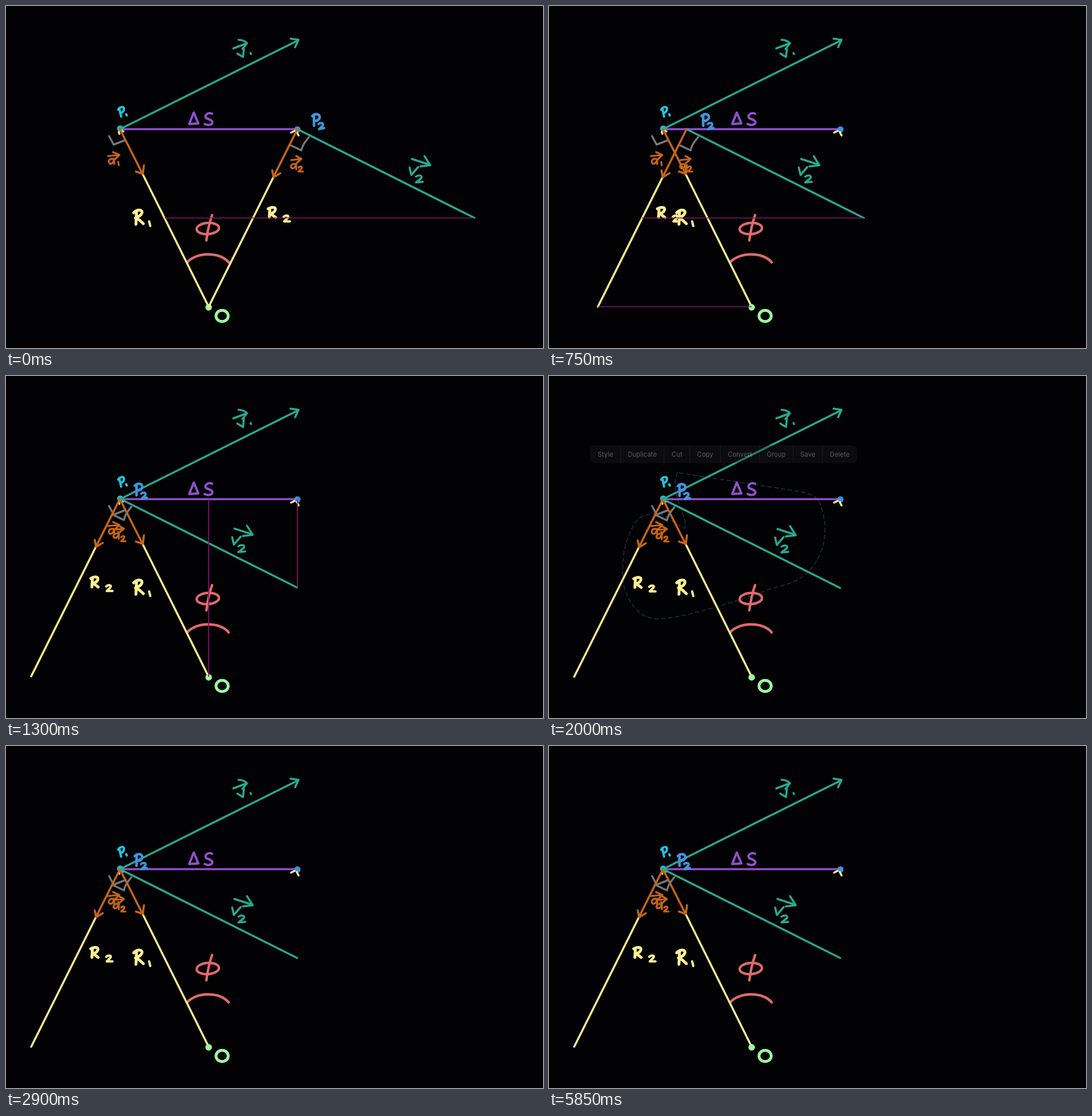
Animation, 938 px wide and 597 px high, one loop 5.9 s. Source, as an HTML page:

```html
<!DOCTYPE html>
<html lang="en">
<head>
<meta charset="utf-8">
<title>Circular motion vectors</title>
<style>
  html, body { margin: 0; width: 100%; height: 100%; overflow: hidden; background: #020103; }
  svg { display: block; width: 938px; height: 597px; }
  path, line, ellipse { fill: none; stroke-linecap: round; stroke-linejoin: round; }
  .teal { stroke: #27ab92; stroke-width: 3.5; }
  .purple { stroke: #9150cf; stroke-width: 3.6; }
  .cyan { stroke: #20c3df; stroke-width: 4; }
  .blue { stroke: #3f95df; stroke-width: 4.5; }
  .orange { stroke: #c66518; stroke-width: 3.6; }
  .yellow { stroke: #fff092; stroke-width: 3.5; }
  .gray { stroke: #777; stroke-width: 3.5; }
  .red { stroke: #e06a6d; stroke-width: 4.3; }
  .green { stroke: #9cfb9c; stroke-width: 5; }
  .thin { stroke-width: 3.2; }
  .mid { stroke-width: 4; }
  .bold { stroke-width: 5; }
  .guide { stroke: #86146f; stroke-width: 1.7; stroke-linecap: butt; }
  .lasso { stroke: #4a7db3; stroke-width: 1.8; stroke-dasharray: 8 4; stroke-linecap: butt; }
  .menu { fill: #212023; }
  .menu path { fill: #212023; }
  .divider { stroke: #48474a; stroke-width: 1; stroke-linecap: butt; }
  text { fill: #fff; font: 11.4px Inter, Roboto, sans-serif; text-anchor: middle; }
</style>
</head>
<body>
<svg viewBox="0 0 938 597">
  <!-- fixed part of the drawing -->
  <g>
    <path class="red" d="M317 447C324 439 338 433.500 352 433.500C368 433.500 380 437 389 447.500"/>
    <ellipse class="red" cx="352.5" cy="388.5" rx="19.5" ry="9.8" transform="rotate(-4 352 388)"/>
    <path class="red" d="M360 365C355 379 352 393 350 409"/>

    <path class="yellow" d="M238 292L354 525"/>
    <path class="yellow bold" d="M228 359L227 381M223 361C229 354 240 355 237 362C235 367 229 369 226 370C232 371 235 376 240 380"/>
    <path class="yellow mid" d="M250 376L252 384"/>

    <path class="purple" d="M202 215H509"/>
    <path class="purple mid" d="M328 186L320 206L336 205ZM360 188C353 185 345 191 350 196C356 198 364 201 359 206C356 208 351 208 347 206"/>

    <circle cx="354" cy="526" r="5.7" fill="#9cfb9c"/>
    <ellipse class="green" cx="377.5" cy="541" rx="10.7" ry="9.7"/>

    <circle cx="199.500" cy="214" r="5.500" fill="#20b5d3"/>
    <circle cx="509" cy="215.500" r="5.500" fill="#3f8fdd"/>
    <path class="yellow" d="M197 220L198 223M203 218L205 219M498 221L504 218M508 220L511 226"/>
    <path class="cyan" d="M198 179L201 193M196 181C199 175 207 175 206 180C206 184 203 186 200 187M210 189L211 191"/>

    <path class="teal" d="M199 215L510 60M497 57L511 59L505 72"/>
    <path class="teal" d="M397 74L421 65M406 59C412 59 417 61 421 65L413 75M404 83L414 89L415.500 75M427 82L428 84"/>

    <path class="gray" d="M180 227L188 242L206 235"/>
    <path class="orange" d="M199 215L238 292M227 289L239 293L241 278"/>
    <path class="orange thin" d="M178 262L198 260M187 255L198 260L191 267M188 267C181 265 177 272 181 275C185 277 188 272 189 267L189 276M196 272L197 278"/>
  </g>

  <!-- dragged selection -->
  <g id="drag">
    <path class="yellow" d="M467.500 298L354 525"/>
    <path class="yellow bold" d="M461 353L460 369M458 354C465 350 473 351 470 357C468 361 464 362 461 362C465 364 468 367 471 369"/>
    <path class="yellow mid" d="M485 368C489 364 496 366 492 370L486 376L496 376"/>
    <path class="teal" d="M509 215L818.500 370"/>
    <path class="teal" d="M709 267L740 277M731 262L741 278L724 280M705 282L708 295L720 281M716 298C721 294 729 296 725 301L716 308L728 307"/>
    <path class="blue" d="M538 191L538 209M535 192C540 187 549 188 548 195C547 199 542 201 538 201"/>
    <path class="blue mid" d="M546 206C550 203 556 204 553 209L547 215L556 213"/>
    <path class="gray" d="M497 243L516 252C518 243 521 239 529 229"/>
    <path class="orange" d="M509 215L467.500 298M465 287L467.500 299L479 292"/>
    <path class="orange thin" d="M498 269L516 267M507 262L516 267L508 274M506 276C499 274 496 280 499 283C503 285 506 280 507 276L507 285M511 282C514 279 519 280 516 284L511 289L519 289"/>
  </g>

  <g id="level">
    <line class="guide" id="mid" y1="370" y2="370"/>
    <line class="guide" id="base" x2="354" y1="525" y2="525"/>
  </g>
  <path class="guide" id="plumb" d="M354 215V525M509 215V370"/>

  <g id="selection">
    <path class="lasso" d="M227 169L440 202C460 206 468 212 473 222C479 237 483 257 482 275C480 305 465 338 436 355C420 364 400 367 380 374C345 388 318 395 292 403C255 414 215 424 186 424C155 421 141 396 132 371C127 350 129 325 131 306C137 280 148 250 166 244C180 239 190 238 200 243L232 264C240 268 239 262 238 255C234 238 222 215 221 194C220 175 223 167 227 169"/>
    <g class="menu" id="menu">
      <rect x="72" y="121" width="466" height="31" rx="8"/>
      <path d="M297 151L305 157L313 151Z"/>
    </g>
  </g>
</svg>
<script>
  const LOOP = 5900;
  const $ = id => document.getElementById(id);

  // time, x offset, y offset of the dragged selection
  const track = [
    [0, 0, 0], [200, -8, 0], [300, -22, 0], [400, -55, 0], [500, -118, 0],
    [600, -188, 0], [680, -236, 0], [750, -268.5, 0], [900, -291, 0],
    [1200, -306, 0], [1300, -310, -0.7], [1500, -310, 0], [LOOP, -310, 0]
  ];

  const add = (tag, attrs, label = '') => {
    const el = document.createElementNS('http://www.w3.org/2000/svg', tag);
    for (const key in attrs) el.setAttribute(key, attrs[key]);
    el.textContent = label;
    $('menu').append(el);
  };

  const edges = [72, 125, 201, 246, 299.5, 367.5, 426.5, 478, 538];
  ['Style', 'Duplicate', 'Cut', 'Copy', 'Convert', 'Group', 'Save', 'Delete'].forEach((label, i) => {
    if (i) add('line', { class: 'divider', x1: edges[i], x2: edges[i], y1: 121, y2: 152 });
    add('text', { x: (edges[i] + edges[i + 1]) / 2, y: 141 }, label);
  });

  function offsetAt(t) {
    const i = track.findIndex(key => key[0] > t);
    const [t0, x0, y0] = track[i - 1], [t1, x1, y1] = track[i];
    const p = (t - t0) / (t1 - t0);
    return [x0 + (x1 - x0) * p, y0 + (y1 - y0) * p];
  }

  const show = (id, on) => { $(id).style.display = on ? '' : 'none'; };
  const fade = (t, from, to) => Math.min(1, Math.max(0, (t - from) / (to - from)));

  function draw(now) {
    const t = now % LOOP;
    const [x, y] = offsetAt(t);
    $('drag').setAttribute('transform', `translate(${x} ${y})`);
    $('mid').setAttribute('x1', Math.min(277, 431 + x));
    $('mid').setAttribute('x2', 819 + x);
    $('base').setAttribute('x1', 354 + x);
    show('level', t < 1225);
    show('plumb', t >= 1225 && t < 1500);
    $('selection').style.opacity = fade(t, 1950, 2100) * (1 - fade(t, 2600, 2750));
  }

  const start = performance.now();
  function tick() {
    draw(performance.now() - start);
    requestAnimationFrame(tick);
  }
  tick();
</script>
</body>
</html>
```
